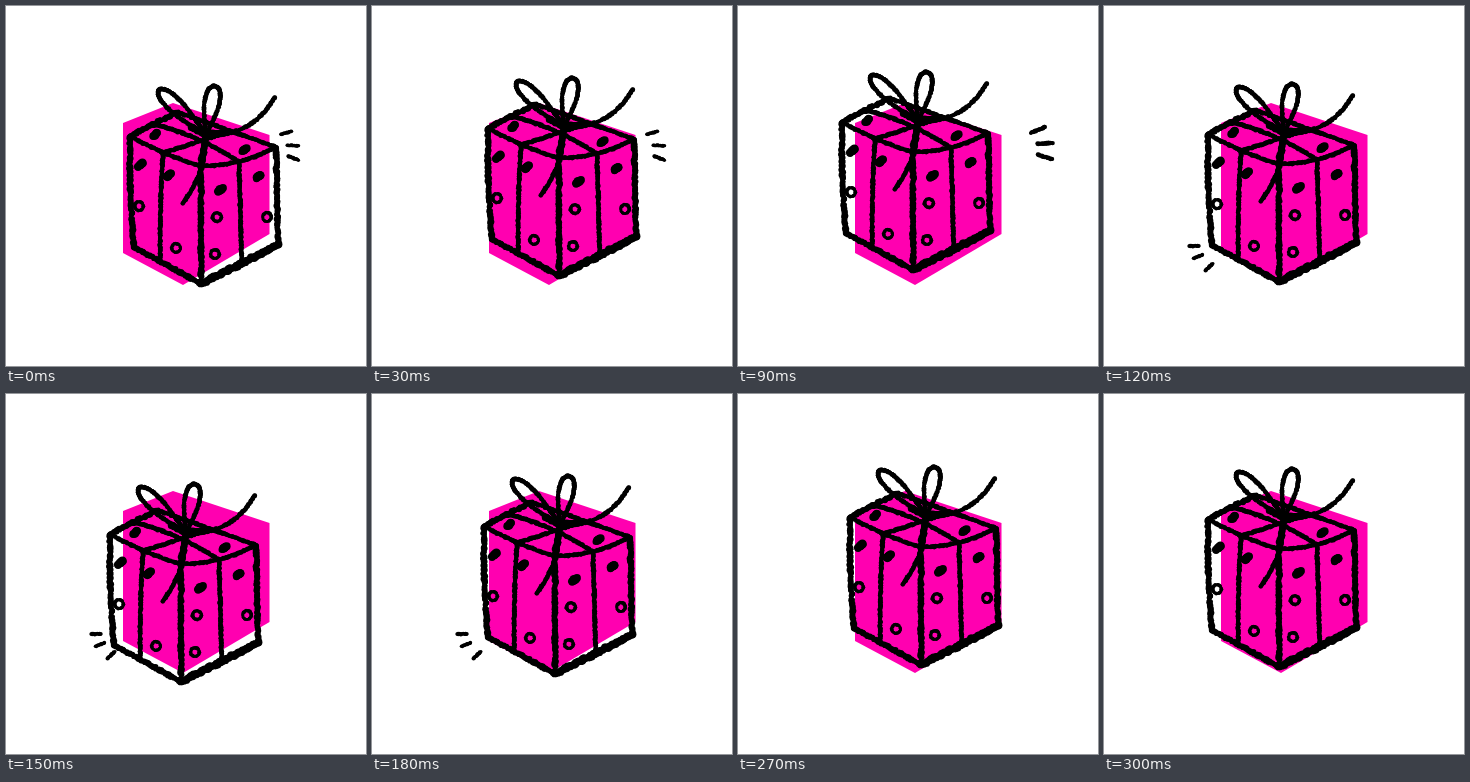
An HTML page with a canvas for the animation above (0.37 s loop, 360 by 360 pixels).

```html
<!DOCTYPE html>
<html lang="en">
<head>
<meta charset="utf-8">
<title>Shaking gift</title>
<style>
html, body { margin: 0; width: 100%; height: 100%; overflow: hidden; background: #fff; }
canvas { display: block; width: 360px; height: 360px; }
</style>
</head>
<body>
<canvas id="stage" width="360" height="360"></canvas>
<script>
const SIZE = 360, LOOP = 370, STEP = 30, LAST = 300, LEG = 75;
const PINK = '#ff00b0', INK = '#000', TAU = Math.PI * 2;
const ctx = document.getElementById('stage').getContext('2d');

let seed = 7;
function random() {
  seed = (seed * 16807) % 2147483647;
  return seed / 2147483647;
}

const mix = (a, b, u) => a.map((v, i) => v + (b[i] - v) * u);

function layer(draw) {
  const canvas = document.createElement('canvas');
  canvas.width = canvas.height = SIZE;
  const c = canvas.getContext('2d');
  c.fillStyle = INK;
  draw(c);
  return canvas;
}

// Charcoal trace: uneven dabs along at(u), u from 0 to 1.
function trace(c, at, length, width, rough) {
  const count = Math.ceil(length / 0.8);
  for (let i = 0; i <= count; i++) {
    const [x, y] = at(i / count).map(v => v + (random() - 0.5) * rough);
    c.beginPath();
    c.arc(x, y, width / 2 * (0.8 + random() * 0.35), 0, TAU);
    c.fill();
  }
}

// Line from a to b, bowed sideways by `bend` pixels in the middle.
function line(c, a, b, { width = 4.4, rough = 1.1, bend = 0 } = {}) {
  const dx = b[0] - a[0], dy = b[1] - a[1], length = Math.hypot(dx, dy);
  trace(c, u => {
    const side = 4 * u * (1 - u) * bend / length;
    return [a[0] + dx * u - dy * side, a[1] + dy * u + dx * side];
  }, length, width, rough);
}

// Bow loop that leaves the knot, rounds the tip and returns.
function petal(c, knot, tip, breadth) {
  const dx = tip[0] - knot[0], dy = tip[1] - knot[1], length = Math.hypot(dx, dy);
  trace(c, u => {
    const along = Math.sin(Math.PI * u), side = Math.sin(TAU * u) * breadth / length;
    return [knot[0] + dx * along - dy * side, knot[1] + dy * along + dx * side];
  }, length * 2.4, 4.3, 0.9);
}

function ring(c, [x, y]) {
  trace(c, u => [x + 4.4 * Math.cos(TAU * u), y + 4.4 * Math.sin(TAU * u)], 28, 3.3, 0.7);
}

function blob(c, [x, y]) {
  line(c, [x - 2, y + 1.5], [x + 2.5, y - 2], { width: 8 });
}

function drawBox(c) {
  const left = [124, 130], back = [171, 106], right = [270, 141], front = [194, 160];
  const leftFoot = [128, 241], frontFoot = [195, 278], rightFoot = [272, 239];
  const ribbonLeft = [157, 147], ribbonRight = [233, 156];
  const edge = { width: 5.2, rough: 2 };

  line(c, left, back, edge);
  line(c, back, right);
  line(c, left, front, { bend: 2 });
  line(c, front, right, { bend: 5 });
  line(c, left, leftFoot, { ...edge, bend: 1.5 });
  line(c, right, rightFoot, edge);
  line(c, [195, 150], frontFoot, edge);
  line(c, leftFoot, frontFoot, edge);
  line(c, frontFoot, rightFoot, { width: 7, rough: 2 });

  line(c, ribbonLeft, mix(leftFoot, frontFoot, 0.42).map(v => v - 2), { bend: 1 });
  line(c, ribbonRight, mix(frontFoot, rightFoot, 0.53));
  line(c, ribbonLeft, mix(back, right, 0.55));
  line(c, mix(left, back, 0.5), ribbonRight, { bend: -4 });
}

function drawBow(c) {
  const knot = [200, 129];
  petal(c, knot, [153, 84], 7);
  petal(c, knot, [209, 80], 7.5);
  line(c, knot, [269, 91], { bend: 12 });
  line(c, knot, [177, 197], { bend: -6 });
  line(c, knot, [223, 126], { width: 7 });
  line(c, [185, 121], knot, { width: 6.5 });
  line(c, knot, [197, 148], { width: 6 });
}

const blobs = [[149, 129], [134, 159], [163, 169], [214, 184], [252, 171], [238, 144]];
const rings = [[133, 200], [211, 211], [170, 242], [209, 248], [261, 211]];

const gift = layer(c => {
  drawBox(c);
  drawBow(c);
  blobs.forEach(p => blob(c, p));
  rings.forEach(p => ring(c, p));
});

// Three dashes between two centres, turning evenly and bulging away from the gift.
function fan(first, last, angles, length, width) {
  return layer(c => {
    for (let i = 0; i < 3; i++) {
      const [x, y] = mix(first, last, i / 2);
      const [angle] = mix([angles[0]], [angles[1]], i / 2);
      const bulge = i === 1 ? Math.sign(x - SIZE / 2) * 3.5 : 0;
      const dx = Math.cos(angle) * length / 2, dy = Math.sin(angle) * length / 2;
      line(c, [x + bulge - dx, y - dy], [x + bulge + dx, y + dy], { width, rough: 0.7 });
    }
  });
}

const rightNear = fan([280, 127], [287, 152], [-0.28, 0.38], 11, 3.6);
const rightFar = fan([300, 124], [307, 151], [-0.4, 0.3], 15, 4.3);
const leftNear = fan([90, 240], [105, 261], [0, -0.75], 10, 3.8);
const leftFar = fan([72, 249], [88, 271], [-0.12, -0.8], 17, 4.3);

function marksAt(time) {
  if (time < 60) return rightNear;
  if (time < 120) return rightFar;
  if (time < 210) return leftNear;
  return time < 270 ? leftFar : null;
}

// Corners of the shaking path, one leg every 75 ms.
const shake = [[0, 0], [-20, -20], [-20, 10], [0, -10], [-20, -5]];

function offsetAt(time) {
  const leg = Math.min(Math.floor(time / LEG), shake.length - 2);
  return mix(shake[leg], shake[leg + 1], time / LEG - leg).map(Math.round);
}

const pane = new Path2D('M117 117 L167 97 L263.5 129 V228 L177 279 L117 247 Z');

function render(now) {
  const time = Math.min(Math.floor((now % LOOP) / STEP) * STEP, LAST);
  ctx.fillStyle = '#fff';
  ctx.fillRect(0, 0, SIZE, SIZE);
  ctx.fillStyle = PINK;
  ctx.fill(pane);
  ctx.drawImage(gift, ...offsetAt(time));
  const marks = marksAt(time);
  if (marks) ctx.drawImage(marks, 0, 0);
}

const start = performance.now();
function tick() {
  render(performance.now() - start);
  requestAnimationFrame(tick);
}
tick();
</script>
</body>
</html>
```
